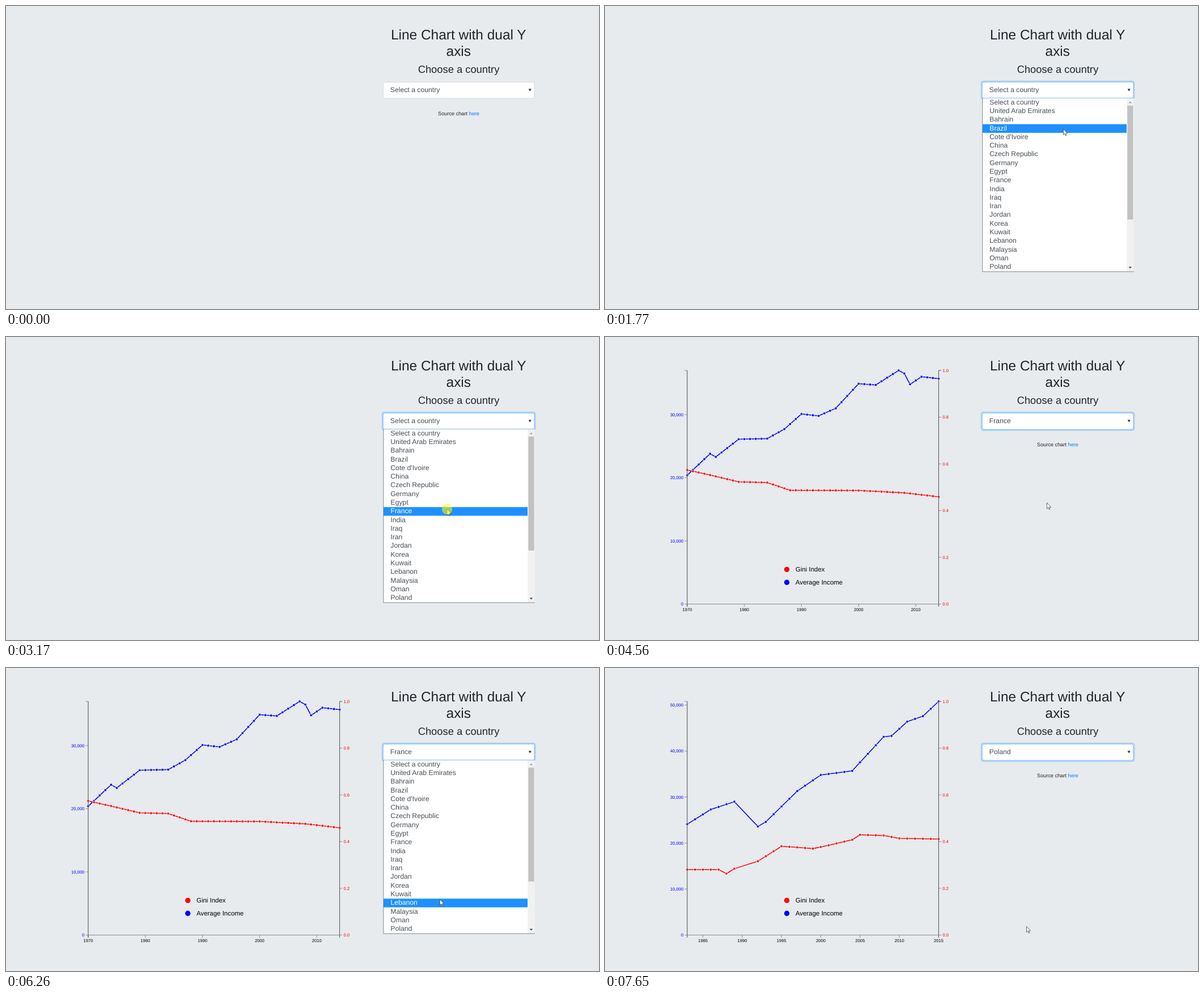
These frames come from a looping animation (1046 px wide and 535 px high, 8 s). An HTML page:

```html
<!DOCTYPE html>
<html lang="en">
<head>
<meta charset="utf-8">
<title>Line chart with dual Y axis</title>
<style>
  html, body { margin: 0; width: 100%; height: 100%; overflow: hidden; background: #e7ebee; }
  svg { display: block; width: 1046px; height: 535px; }
  text { font-family: "Liberation Sans", Arial, sans-serif; text-rendering: geometricPrecision; white-space: pre; }
</style>
</head>
<body>
<svg id="stage" viewBox="0 0 1046 535" xmlns="http://www.w3.org/2000/svg"></svg>
<script>
const LOOP = 8000, STEP = 76.8;
const COUNTRIES = ['Select a country', 'United Arab Emirates', 'Bahrain', 'Brazil', "Cote d'Ivoire",
  'China', 'Czech Republic', 'Germany', 'Egypt', 'France', 'India', 'Iraq', 'Iran', 'Jordan',
  'Korea', 'Kuwait', 'Lebanon', 'Malaysia', 'Oman', 'Poland'];
const FRANCE = COUNTRIES.indexOf('France'), POLAND = COUNTRIES.indexOf('Poland');
const ROW_TOP = 162.8, ROW_H = 15.28;
const LEFT = 145, RIGHT = 588.5, TOP = 59, BOTTOM = 471.5, TICK = 4.6;

const text = (x, y, size, str, fill = '#212529', anchor = 'start', extra = '') =>
  `<text x="${x}" y="${y}" font-size="${size}" fill="${fill}" text-anchor="${anchor}" ${extra}>${str}</text>`;
const rect = (x, y, w, h, fill, extra = '') =>
  `<rect x="${x}" y="${y}" width="${w}" height="${h}" fill="${fill}" ${extra}/>`;
const dot = (x, y, r, fill, extra = '') =>
  `<circle cx="${x}" cy="${y}" r="${r}" fill="${fill}" ${extra}/>`;
const triangle = (x, y, w, h, fill) => `<path d="M${x} ${y}h${w}l${-w / 2} ${h}Z" fill="${fill}"/>`;
const line = (d, stroke, width) =>
  `<path d="${d}" fill="none" stroke="${stroke}" stroke-width="${width}"/>`;

// Turning points by year; the years between are interpolated. Income is in thousands.
const franceData = {
  xStep: 10, gap: [],
  income: { 1970: 20.4, 1974: 23.8, 1975: 23.3, 1979: 26.1, 1984: 26.2, 1987: 27.7, 1990: 30.1, 1993: 29.8,
    1996: 31, 2000: 34.9, 2003: 34.7, 2007: 37, 2008: 36.5, 2009: 34.8, 2011: 36, 2014: 35.7 },
  gini: { 1970: .574, 1974: .552, 1979: .523, 1984: .52, 1988: .487, 2000: .486, 2008: .476, 2014: .459 }
};
const polandData = {
  xStep: 5, gap: [1990, 1991],
  income: { 1983: 24.1, 1986: 27.3, 1989: 29, 1992: 23.6, 1993: 24.6, 1997: 31.3, 2000: 34.8,
    2004: 35.7, 2008: 43.1, 2009: 43.3, 2011: 46.4, 2013: 47.6, 2015: 50.8 },
  gini: { 1983: .28, 1987: .28, 1988: .263, 1989: .284, 1992: .316, 1995: .38, 1999: .37,
    2001: .384, 2004: .408, 2005: .429, 2008: .426, 2010: .414, 2015: .411 }
};

function valueAt(knots, year) {
  const keys = Object.keys(knots).map(Number);
  const a = keys.filter(k => k <= year).pop();
  const b = keys.find(k => k > year) ?? a;
  return knots[a] + (knots[b] - knots[a]) * (year - a) / (b - a || 1);
}

function chart(id, { xStep, gap, income, gini }) {
  const keys = Object.keys(income).map(Number);
  const first = keys[0], last = keys[keys.length - 1];
  const max = Math.max(...Object.values(income));
  const years = Array.from({ length: last - first + 1 }, (_, i) => first + i).filter(y => !gap.includes(y));
  const xOf = year => LEFT + (year - first) / (last - first) * (RIGHT - LEFT);
  const yOf = share => BOTTOM - share * (BOTTOM - TOP);

  const series = (knots, top, color) => {
    const pts = years.map(y => [xOf(y), yOf(valueAt(knots, y) / top)]);
    return line('M' + pts.join('L'), color, 1.55) +
      pts.map(([x, y]) => dot(x, y, 2.3, color, 'stroke="#fff" stroke-width=".76"')).join('');
  };

  let ticks = '', labels = '';
  for (let k = 0; k <= max; k += 10) {
    const y = yOf(k / max);
    ticks += `M${LEFT - TICK} ${y}H${LEFT}`;
    labels += text(138.3, y + 2.7, 7.64, k ? k + ',000' : '0', '#00f', 'end');
  }
  for (let k = 0; k <= 5; k++) {
    const y = yOf(k / 5);
    ticks += `M${RIGHT} ${y}h${TICK}`;
    labels += text(595.4, y + 2.7, 7.64, (k / 5).toFixed(1), '#f00');
  }
  for (const year of years.filter(y => y % xStep === 0 || (y === 1990 && xStep === 5)).concat(gap.filter(y => y % xStep === 0))) {
    ticks += `M${xOf(year)} ${BOTTOM}v${TICK}`;
    labels += text(xOf(year), 484.2, 7.64, year, '#000', 'middle');
  }
  const frame = `M${LEFT - TICK} ${TOP}H${LEFT}M${RIGHT + TICK} ${TOP}H${RIGHT}M${LEFT} ${BOTTOM}H${RIGHT}`;
  const sides = `M${LEFT} ${TOP}V${BOTTOM + TICK}M${RIGHT} ${TOP}V${BOTTOM + TICK}`;
  const legend = (y, color, label) => dot(320.7, y, 4.7, color) + text(336, y + 3.2, 11.46, label, '#000');

  return `<g id="${id}">` + series(income, max, '#00f') + series(gini, 1, '#f00') +
    line(ticks + frame, '#777', 0.8) + line(sides, '#666', 1.2) + labels +
    legend(410.4, '#f00', 'Gini Index') + legend(433.3, '#00f', 'Average Income') + '</g>';
}

const list = '<g id="list">' +
  rect(665.9, 162.4, 266.6, 306.5, '#fff') +
  rect(920.4, 162.8, 12.4, 305.8, '#f1f1f1') + rect(921.4, 175.8, 10.2, 201.2, '#c1c1c1') +
  triangle(923.6, 171.6, 5.6, -3.2, '#a3a3a3') + triangle(923.6, 460.4, 5.6, 3.2, '#404040') +
  line('M665.8 162.4V469H933', '#737b83', 0.9) + line('M665.8 162.5H932.6', '#80b4ea', 0.9) +
  rect(666, 0, 254, ROW_H, '#1e90ff', 'id="bar"') +
  COUNTRIES.map((name, i) =>
    text(678.3, ROW_TOP + i * ROW_H + 11, 12.22, name, '#495057', 'start', 'class="row"')).join('') +
  '</g>';

document.getElementById('stage').innerHTML =
  chart('france', franceData) + chart('poland', polandData) +
  text(798.3, 59, 24.45, 'Line Chart with dual Y', '#212529', 'middle') +
  text(798.3, 88.4, 24.45, 'axis', '#212529', 'middle') +
  text(798.5, 117.6, 18.34, 'Choose a country', '#212529', 'middle') +
  text(798.5, 192.6, 9.17, 'Source chart <tspan fill="#007bff">here</tspan>', '#212529', 'middle') +
  rect(662.7, 131.7, 271.8, 34, '#add0f4', 'rx="4.6" id="glow"') +
  rect(665.4, 134.4, 266.4, 28.6, '#fff', 'rx="3" stroke-width=".8" id="box"') +
  text(677.8, 152.4, 12.22, '', '#495057', 'start', 'id="value"') +
  triangle(921.8, 146.2, 5, 4.6, '#333') +
  list +
  '<path id="cursor" d="M0 0V10.6L2.4 8.5L4 12.1L5.5 11.5L3.9 8H7.2Z" fill="#fff" stroke="#2a2a2a" stroke-width=".7"/>' +
  dot(0, 0, 9.2, '#ff0', 'id="click" fill-opacity=".55"');

const $ = id => document.getElementById(id);
const rows = [...document.querySelectorAll('.row')];
const show = (id, on) => $(id).setAttribute('visibility', on ? 'inherit' : 'hidden');

const easeIn = p => u => u ** p;
const easeOut = p => u => 1 - (1 - u) ** p;

// Each pointer move starts where the one before it ended.
const START = { x: 955, y: 570 };
const MOVES = [
  { at: 210, steps: 10, x: 829, y: 152, ease: easeOut(1.4) },
  { at: 1540, steps: 11, x: 783, y: 298, ease: easeOut(1.3) },
  { at: 2620, steps: 6, x: 778, y: 304, ease: easeOut(1) },
  { at: 4560, steps: 8, x: 798, y: 150.5, ease: easeIn(1.25) },
  { at: 5640, steps: 11, x: 763.5, y: 422, ease: easeOut(1.75) },
  { at: 6490, steps: 10, x: 743.5, y: 456, ease: easeOut(1.2) }
];
const CLICKS = [1070, 3170, 5260, 7350], CLICK_MS = 235;
const OPEN = [[1230, 3400], [5330, 7580]];

function pointer(t) {
  const i = MOVES.filter(m => t >= m.at).length - 1;
  if (i < 0) return null;
  const to = MOVES[i], from = MOVES[i - 1] || START;
  const done = Math.min(to.steps, Math.floor((t - to.at) / STEP + 0.05) + 1);
  const e = to.ease(done / to.steps);
  return { x: from.x + (to.x - from.x) * e, y: from.y + (to.y - from.y) * e };
}

function draw(t) {
  const pos = pointer(t);
  const chosen = t < 3400 ? 0 : t < 7580 ? FRANCE : POLAND;
  const open = OPEN.some(([a, b]) => t >= a && t < b);
  const focus = t >= OPEN[0][0];

  show('france', t >= 3490 && t < 7650);
  show('poland', t >= 7650);
  show('glow', focus);
  $('box').setAttribute('stroke', focus ? '#80bdff' : '#ced4da');
  $('value').textContent = COUNTRIES[chosen];

  show('list', open);
  if (open) {
    const over = Math.floor((pos.y - ROW_TOP) / ROW_H);
    const active = over >= 0 ? over : chosen;
    $('bar').setAttribute('y', ROW_TOP + active * ROW_H);
    rows.forEach((row, i) => row.setAttribute('fill', i === active ? '#fff' : '#495057'));
  }

  show('cursor', pos);
  show('click', CLICKS.some(c => t >= c && t < c + CLICK_MS));
  if (pos) for (const id of ['cursor', 'click']) $(id).setAttribute('transform', `translate(${pos.x} ${pos.y})`);
}

function tick() {
  draw(performance.now() % LOOP);
  requestAnimationFrame(tick);
}
tick();
</script>
</body>
</html>
```
